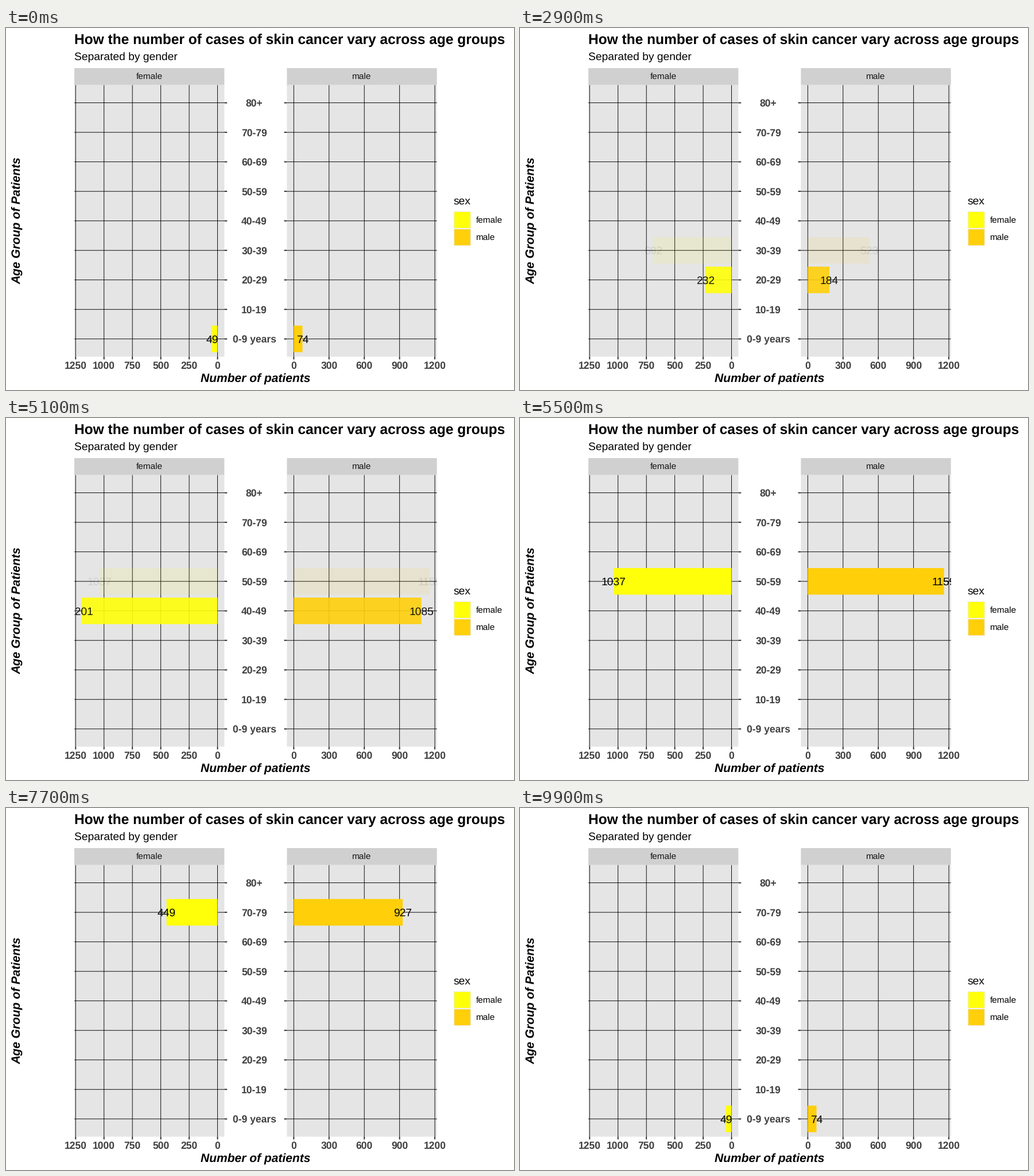
These frames come from a looping animation (885 px wide and 632 px high, 10 s). A matplotlib script:

```python
import math

import matplotlib.pyplot as plt
from matplotlib.animation import FuncAnimation
from matplotlib.patches import Rectangle

W, H, DPI = 885, 632, 100
FRAMES, INTERVAL = 100, 100

plt.rcParams["font.family"] = "Liberation Sans"
plt.rcParams["text.hinting"] = "none"
plt.rcParams["text.hinting_factor"] = 8

PT = 126.2 / 72  # pixels per typographic point
TICK = 2.75 * PT
TOP, BOTTOM = 99.66, 573.74
ROW = (BOTTOM - TOP) / 9.2
AGES = ["0-9 years", "10-19", "20-29", "30-39", "40-49",
        "50-59", "60-69", "70-79", "80+"]

# left and right edge, x of zero, pixels per patient, axis breaks, colour, counts
PANELS = {
    "female": (119.1, 380.4, 368.55, -0.1978, range(0, 1251, 250), "#FFFF0A",
               [49, 77, 232, 692, 1201, 1037, 615, 449, 195]),
    "male": (489.4, 750.7, 501.33, 0.2048, range(0, 1201, 300), "#FFCF0A",
             [74, 41, 184, 523, 1085, 1159, 916, 927, 490]),
}

fig = plt.figure(figsize=(W / DPI, H / DPI), dpi=DPI, facecolor="white")
ax = fig.add_axes([0, 0, 1, 1])
ax.set_xlim(0, W)
ax.set_ylim(H, 0)
ax.axis("off")


def rect(x0, y0, x1, y1, color, **kw):
    return ax.add_patch(Rectangle((x0, y0), x1 - x0, y1 - y0, facecolor=color,
                                  linewidth=0, snap=False, **kw))


def line(xs, ys, color="black", width=0.935):
    ax.plot(xs, ys, color=color, lw=width * 72 / DPI, zorder=2,
            solid_capstyle="butt", snap=False)


def tick(xs, ys):
    line(xs, ys, "#282828", 1.87)


def label(x, y, text, size, **kw):
    return ax.text(x, y, text, fontsize=size * PT * 72 / DPI,
                   **{"ha": "center", "va": "baseline", **kw})


def row_y(i):
    return BOTTOM - (0.6 + i) * ROW


bars = []  # (age group, bar, number)
for name, (left, right, zero, scale, breaks, color, counts) in PANELS.items():
    rect(left, 70, right, TOP, "#D0D0D0", zorder=1)
    panel = rect(left, TOP, right, BOTTOM, "#E5E5E5", zorder=1)
    label((left + right) / 2, 90, name, 8.8, color="#141414")
    for value in breaks:
        x = zero + scale * value
        line([x, x], [TOP, BOTTOM])
        tick([x, x], [BOTTOM, BOTTOM + TICK])
        label(x, 595, str(value), 10, weight="bold", color="#404040")
    inner = (right, right + TICK) if name == "female" else (left - TICK, left)
    for i, count in enumerate(counts):
        y, x = row_y(i), zero + scale * count
        line([left, right], [y, y])
        tick(inner, [y, y])
        bar = rect(min(zero, x), y - 0.45 * ROW, max(zero, x), y + 0.45 * ROW,
                   color, zorder=3)
        number = label(x, y + 6.9, str(count), 11, zorder=4, clip_on=True)
        number.set_clip_path(panel)
        bars.append((i, bar, number))

for i, age in enumerate(AGES):
    label(432.6, row_y(i) + 6.4, age, 10, weight="bold", color="#404040")

label(119.1, 28, "How the number of cases of skin cancer vary across age groups",
      14, weight="bold", ha="left")
label(119.1, 56, "Separated by gender", 11, ha="left")
label(434.9, 618, "Number of patients", 12, weight="bold", style="italic")
label(25, 336.5, "Age Group of Patients", 12, weight="bold", style="italic",
      rotation=90, rotation_mode="anchor")

label(779, 308, "sex", 11, ha="left")
for name, y in (("female", 319.9), ("male", 350.2)):
    rect(779.9, y, 810.2, y + 30.3, "#EEEEEE", zorder=1)
    rect(781.1, y + 1.2, 809, y + 29.1, PANELS[name][5], zorder=2)
    label(819, y + 20.8, name, 8.8, ha="left")


def pose(frame):
    """Opacity of every age group: hold, then cross-fade to the next."""
    alpha = [0.0] * len(AGES)
    alpha[0] = 1.0
    for k in range(len(AGES)):
        start, steps = (3, 7) if k == 0 else (6 + 11 * k, 5)
        t = min(max((frame - start) / steps, 0), 1)
        if t == 0:
            break
        eased = (1 - math.cos(math.pi * t)) / 2
        alpha[k] = 1 - eased
        alpha[(k + 1) % len(AGES)] = eased
    return alpha


def update(frame):
    alpha = pose(frame)
    for i, bar, number in bars:
        for artist in (bar, number):
            artist.set_alpha(alpha[i])
            artist.set_visible(alpha[i] > 0)
    return []


anim = FuncAnimation(fig, update, frames=FRAMES, interval=INTERVAL,
                     repeat=True, repeat_delay=0, blit=False)
plt.show()
```
